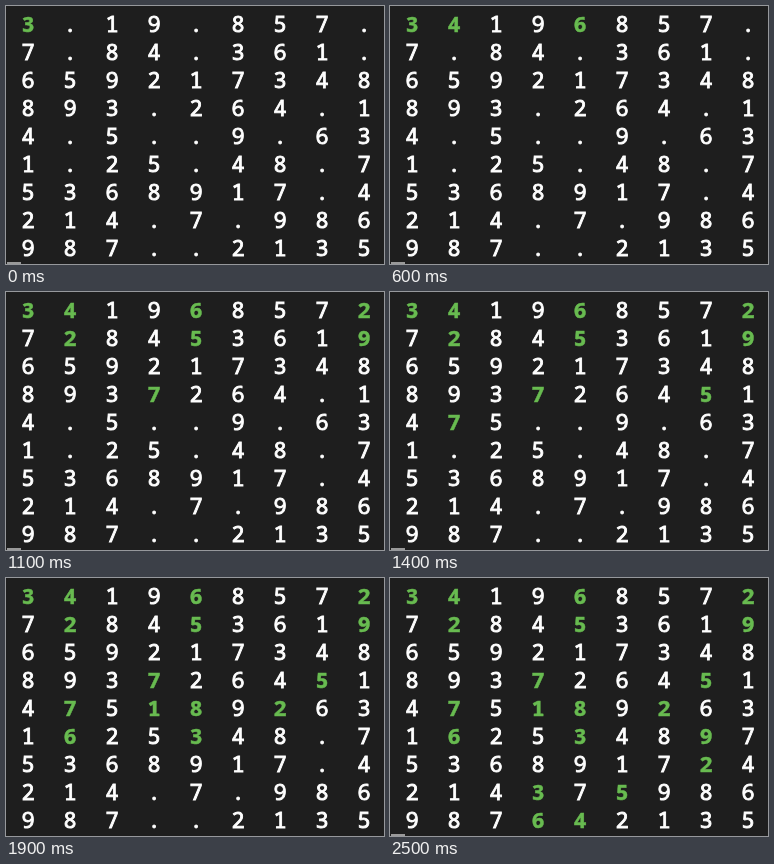
Animation of 378 by 258 pixels, one loop 2600 ms. Source, as an HTML page:

```html
<!DOCTYPE html>
<html>
<head>
<meta charset="utf-8">
<style>
html, body { margin: 0; height: 100%; overflow: hidden; background: #1e1e1e; }
svg { display: block; width: 378px; height: 258px; }
text {
  font: 22px "Noto Sans Mono", "DejaVu Sans Mono", monospace;
  text-anchor: middle; fill: #fff; stroke: #fff; stroke-width: 0.9px;
}
.found { font-weight: 700; fill: #68bb50; stroke: #68bb50; stroke-width: 0.5px; }
</style>
</head>
<body>
<svg viewBox="0 0 378 258"><rect id="cursor" x="1" y="256" width="14" height="2" fill="#999"/></svg>
<script>
const puzzle = [
  "..19.857.", "7.84.361.", "659217348",
  "893.264.1", "4.5..9.63", "1.25.48.7",
  "5368917.4", "214.7.986", "987..2135"
].join("");
const FRAME = 100, FRAMES = 26, PAUSE = 13;

const board = [...puzzle], steps = [];
const show = (i, value) => { board[i] = value; steps.push(board.join("")); };

function fits(i, digit) {
  const row = Math.floor(i / 9), col = i % 9;
  return board.every((value, j) => {
    const r = Math.floor(j / 9), c = j % 9;
    const sameBox = Math.floor(r / 3) === Math.floor(row / 3) && Math.floor(c / 3) === Math.floor(col / 3);
    return value !== digit || !(r === row || c === col || sameBox);
  });
}

// Backtracking solver; every placement and removal is one step.
function solve() {
  const i = board.indexOf(".");
  if (i < 0) return true;
  for (const digit of "123456789") {
    if (!fits(i, digit)) continue;
    show(i, digit);
    if (solve()) return true;
    show(i, ".");
  }
  return false;
}
solve();

const svg = document.querySelector("svg");
const cursor = document.getElementById("cursor");
const cells = [...puzzle].map((_, i) => {
  const cell = document.createElementNS(svg.namespaceURI, "text");
  cell.setAttribute("x", 22 + i % 9 * 42);
  cell.setAttribute("y", 26 + Math.floor(i / 9) * 28);
  return svg.appendChild(cell);
});

function draw(now) {
  const frame = Math.floor(now / FRAME) % FRAMES;
  const state = steps[frame < PAUSE ? frame : frame - 1];
  cells.forEach((cell, i) => {
    cell.textContent = state[i];
    cell.setAttribute("class", state[i] !== puzzle[i] ? "found" : "");
  });
  cursor.style.display = frame > 17 && frame < 25 ? "none" : "";
}

const start = performance.now();
function tick() {
  draw(performance.now() - start);
  requestAnimationFrame(tick);
}
tick();
</script>
</body>
</html>
```
